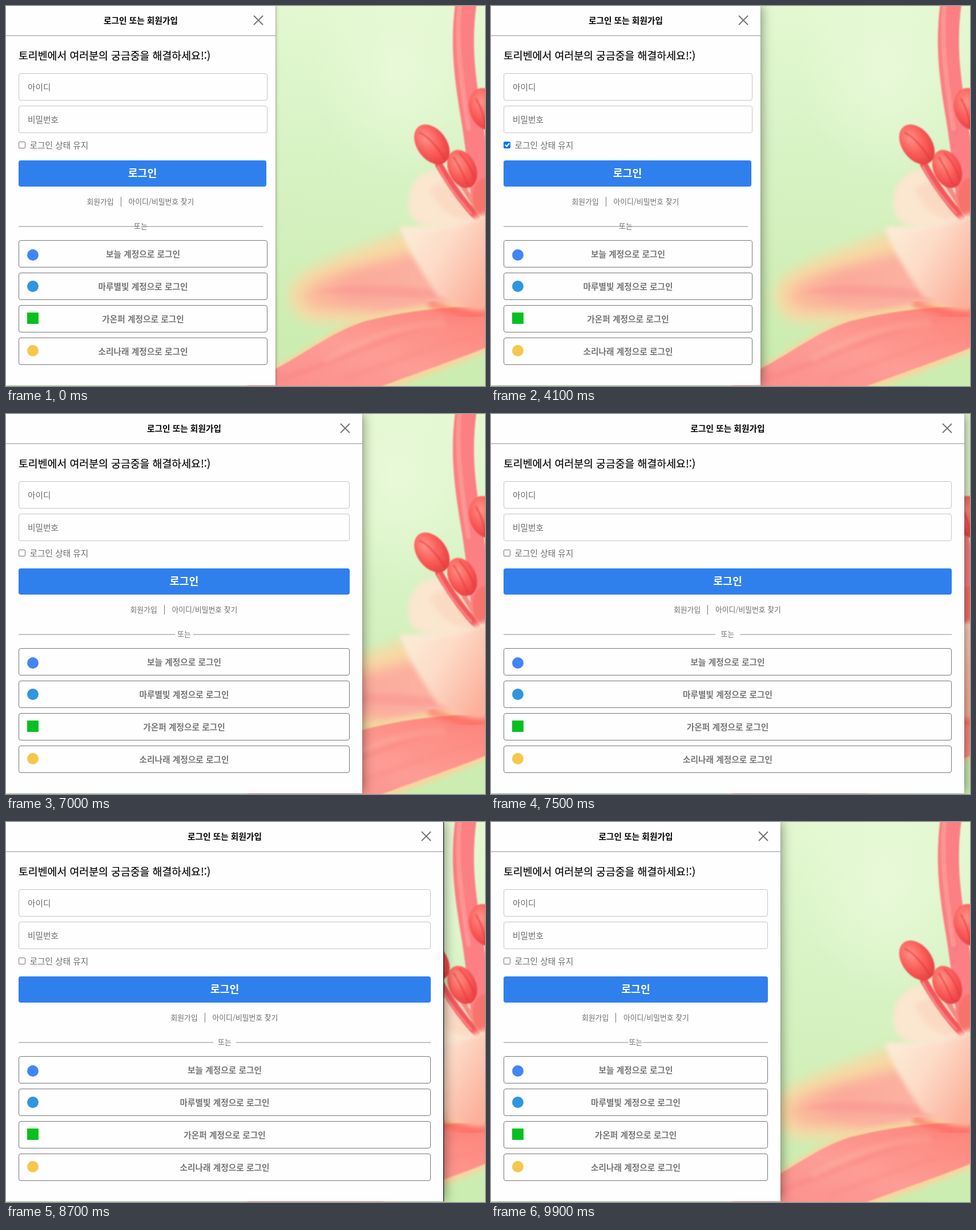
An HTML page for the animation above (10 s loop, 839 px wide and 667 px high).

```html
<!DOCTYPE html>
<html lang="ko">
<head>
<meta charset="utf-8">
<title>로그인 또는 회원가입</title>
<style>
  html, body { margin: 0; width: 100%; height: 100%; overflow: hidden; }
  body { position: relative; background: #d6f1c0; color: #6c6c6c;
    font: 14.7px "Noto Sans CJK KR", "Noto Sans KR", "Noto Sans CJK", sans-serif; white-space: nowrap; }
  .photo { position: absolute; left: 0; top: 0; }
  .page, .page *, .status { position: absolute; box-sizing: border-box; }
  .page { box-sizing: content-box; left: 0; top: 0; width: 472px; height: 666px; background: #fefefe;
    border-right: 0 solid #000; animation: resize 10s step-end infinite, shadow 10s step-end infinite; }

  .title { left: 0; top: 0; width: 100%; height: 53px; line-height: 49px; text-align: center;
    font-weight: 700; color: #000; border-bottom: 2px solid #c4c4c4; }
  .close { right: 21px; top: 16px; width: 18px; height: 18px; fill: none; stroke: #767676; stroke-width: 2; }
  .lead { left: 22px; top: 72px; line-height: 28px; font-size: 18.33px; color: #000; -webkit-text-stroke: .2px; }

  .box { left: 22px; top: var(--y); width: max(436px, 100% - 44px); height: 48px; line-height: 46px;
    border: 1px solid #c4c4c4; border-radius: 4px; padding-left: 15px; }
  .social { border-color: #767676; padding: 0; text-align: center; font-weight: 700; color: #767676; }
  .mark { left: 14px; top: 13px; width: 20px; height: 20px; border-radius: var(--r, 50%); background: var(--c); }
  .caret { left: 15px; top: 13px; width: 1px; height: 21px; background: #000; animation: caret 10s step-end infinite; }

  .check { left: 22px; top: 238px; width: 12px; height: 12px; border: 1px solid #767676; border-radius: 2px;
    background: #fff; animation: check 10s step-end infinite; }
  .check::after { content: ""; position: absolute; left: 3px; top: 0; width: 3px; height: 6px;
    border: solid #fff; border-width: 0 2px 2px 0; transform: rotate(42deg); }
  .keep { left: 41.5px; top: 234px; line-height: 20px; }
  .login { left: 22px; top: 271px; width: max(434px, 100% - 44px); height: 46px; line-height: 43px;
    border-radius: 4px; background: #2f80ed; color: #fff; text-align: center; font-weight: 700; font-size: 18.33px; }

  .links, .or { left: 50%; font-size: 12.83px; line-height: 20px; }
  .links { top: 333px; }
  .links span:first-child { left: -94.5px; }
  .links i { left: -35.5px; top: 2px; width: 1px; height: 17px; background: #767676; }
  .links span:last-child { left: -21.5px; }
  .or { top: 375.5px; transform: translateX(-50%); }
  .rule { top: 386px; height: 2px; width: max(210px, (100% - 44px) * .4725); background: #c4c4c4; }

  .bubble { left: 149px; top: 178px; width: 184px; height: 34px; padding-left: 54px; line-height: 32px; font-size: 12px;
    color: #222; background: #fff; border: 1px solid #c8c8c8; border-radius: 2px;
    box-shadow: 0 2px 4px rgba(0,0,0,.25); animation: bubble 10s step-end infinite; }
  .bubble::before { content: ""; position: absolute; left: 22px; top: -5px; width: 8px; height: 8px; background: #fff;
    border: solid #c8c8c8; border-width: 1px 0 0 1px; transform: rotate(45deg); }
  .bubble b { left: 16px; top: 6px; width: 20px; height: 20px; line-height: 18px; border-radius: 2px;
    background: #ff9800; color: #fff; text-align: center; font-size: 14px; }
  .status { left: 0; top: 646px; width: 156px; height: 20px; padding-left: 4px; line-height: 19px; font-size: 10.9px;
    color: #35484c; background: #7ccad1; border: solid #6fb3bb; border-width: 1px 1px 0 0; border-radius: 0 4px 0 0;
    animation: status 10s step-end infinite; }

  @keyframes resize {
    0% { width: 472px; border-right-width: 0; }
    67% { width: 478px; } 68% { width: 508px; } 69% { width: 562px; } 70% { width: 624px; }
    71% { width: 686px; } 72% { width: 742px; } 73% { width: 788px; } 74% { width: 818px; } 75% { width: 829px; }
    78% { width: 812px; } 79% { width: 775px; } 80% { width: 728px; } 81% { width: 682px; } 82% { width: 645px; border-right-width: 0; }
    83% { width: 633px; border-right-width: 4px; } 84% { width: 662px; border-right-width: 3px; }
    85% { width: 702px; border-right-width: 3px; } 86% { width: 740px; border-right-width: 2px; }
    87% { width: 766px; border-right-width: 1px; } 88% { width: 661px; border-right-width: 0; }
    89% { width: 595px; } 90% { width: 535px; } 91%, 100% { width: 507px; border-right-width: 0; }
  }
  @keyframes shadow {
    0% { box-shadow: 0 0 1px 0 rgba(0,0,0,.6), 1px 0 6px rgba(0,0,0,.25); }
    13%, 100% { box-shadow: 0 0 1px 0 rgba(0,0,0,.5), 2px 0 18px rgba(0,0,0,.42); }
  }
  @keyframes caret {
    0%, 18%, 25%, 33%, 100% { opacity: 0; }
    13%, 20%, 30% { opacity: 1; }
  }
  @keyframes check {
    0%, 50%, 100% { background: #fff; border-color: #767676; }
    33%, 46% { background: #fff; border-color: #4f4f4f; }
    36% { background: #fff; border-color: #8d8d8d; }
    37%, 43% { background: #005cc8; border-color: #005cc8; }
    41% { background: #0075ff; border-color: #0075ff; }
    45% { background: #3793ff; border-color: #3793ff; }
  }
  @keyframes bubble {
    0%, 37%, 100% { opacity: 0; }
    25% { opacity: .7; }
    28% { opacity: 1; }
    36% { opacity: .4; }
  }
  @keyframes status {
    0%, 67%, 100% { opacity: 0; }
    53% { opacity: .5; }
    54% { opacity: 1; }
  }
</style>
</head>
<body>
<svg class="photo" width="839" height="667" viewBox="0 0 839 667">
  <defs>
    <linearGradient id="leaf" x1=".75" y1="0" x2=".6" y2="1">
      <stop offset="0" stop-color="#e4f8d2"/><stop offset=".45" stop-color="#d6f2c2"/><stop offset="1" stop-color="#c9ecae"/>
    </linearGradient>
    <radialGradient id="glow"><stop offset="0" stop-color="#e8f9d8"/><stop offset="1" stop-color="#e8f9d8" stop-opacity="0"/></radialGradient>
    <linearGradient id="cream" x1="0" y1="0" x2="1" y2=".7">
      <stop offset="0" stop-color="#fbf0dc"/><stop offset=".5" stop-color="#fddcc8"/><stop offset="1" stop-color="#fcb09b"/>
    </linearGradient>
    <linearGradient id="side" x1="0" y1="0" x2="1" y2="0">
      <stop offset="0" stop-color="#fabf9c"/><stop offset=".3" stop-color="#fba99a"/><stop offset="1" stop-color="#fcb5a5"/>
    </linearGradient>
    <linearGradient id="low" x1="0" y1="1" x2="1" y2="0">
      <stop offset="0" stop-color="#fb8b8b"/><stop offset=".5" stop-color="#fd9d95"/><stop offset="1" stop-color="#fd837a"/>
    </linearGradient>
    <radialGradient id="anther" cx=".45" cy=".3" r=".75">
      <stop offset="0" stop-color="#ff9186"/><stop offset=".5" stop-color="#fb5f5b"/><stop offset="1" stop-color="#e63a3d"/>
    </radialGradient>
    <filter id="soft1"><feGaussianBlur stdDeviation="1.3"/></filter>
    <filter id="soft4" x="-20%" y="-20%" width="140%" height="140%"><feGaussianBlur stdDeviation="4"/></filter>
    <filter id="soft12" x="-30%" y="-40%" width="160%" height="180%"><feGaussianBlur stdDeviation="11"/></filter>
  </defs>
  <rect width="839" height="667" fill="url(#leaf)"/>
  <ellipse cx="690" cy="110" rx="150" ry="190" fill="url(#glow)"/>

  <g filter="url(#soft12)">
    <path d="M496 502C500 462 590 437 710 392L800 470 790 565C700 575 600 552 540 555 508 550 494 527 496 502Z" fill="#f7d9a4"/>
    <path d="M520 504C532 474 630 455 730 426L800 500 780 550C690 550 620 527 560 534 533 533 515 522 520 504Z" fill="url(#side)"/>
  </g>
  <path d="M540 502C600 488 660 488 770 500L780 515C690 512 620 506 540 502Z" fill="#f9918d" opacity=".5" filter="url(#soft4)"/>

  <path d="M420 680L472 632C530 600 570 567 625 548 700 526 780 518 845 518V606C790 630 730 652 650 680Z"
    fill="#f6d59f" filter="url(#soft4)"/>
  <path d="M400 680L472 637C530 606 575 570 630 553 700 535 780 526 845 528V598C780 624 725 642 640 674V680Z"
    fill="url(#low)" filter="url(#soft1)"/>
  <g fill="none" filter="url(#soft4)">
    <path d="M480 655C600 620 690 560 845 540" stroke="#fa7f7a" stroke-width="7" opacity=".5"/>
    <path d="M560 622C640 575 700 562 770 556" stroke="#ffb3a6" stroke-width="10" opacity=".4"/>
    <path d="M590 655C680 625 740 598 845 572" stroke="#fb8a83" stroke-width="8" opacity=".5"/>
  </g>

  <path d="M845 375C790 392 735 395 712 374 697 350 703 310 735 291 770 280 815 300 845 325Z" fill="#fbe6cf" filter="url(#soft4)"/>
  <path d="M742 320C770 300 810 310 845 340V380C800 380 760 370 742 320Z" fill="#fbd3be" opacity=".6" filter="url(#soft4)"/>

  <g fill="none" stroke-linecap="round" filter="url(#soft1)">
    <path d="M808 -20C795 55 802 120 816 200 825 255 829 300 835 350" stroke="#fc7f83" stroke-width="37"/>
    <path d="M797 -20C786 50 796 120 810 215" stroke="#ff9f9b" stroke-width="8" opacity=".7"/>
    <path d="M758 278C775 308 798 342 824 370" stroke="#f2585b" stroke-width="13"/>
    <path d="M757 282C772 312 793 340 815 364" stroke="#ff8784" stroke-width="3"/>
    <path d="M800 316L830 365" stroke="#f58a80" stroke-width="8"/>
  </g>
  <ellipse cx="839" cy="336" rx="21" ry="34" fill="#f8736c" filter="url(#soft1)"/>
  <g fill="url(#anther)" filter="url(#soft1)">
    <ellipse cx="840" cy="181" rx="28" ry="38" transform="rotate(-20 840 181)"/>
    <ellipse cx="799" cy="286" rx="24" ry="35" transform="rotate(-24 799 286)"/>
    <ellipse cx="746" cy="243" rx="26" ry="39" transform="rotate(-36 746 243)"/>
  </g>
  <g fill="none" stroke="#e0343a" stroke-width="3" opacity=".55" filter="url(#soft1)">
    <path d="M724 222C742 230 757 250 770 270M784 265C792 277 802 298 809 314M794 258C806 270 817 288 820 304M823 162C832 178 838 196 840 213"/>
  </g>

  <path d="M690 389C735 390 800 385 845 363V540C810 536 785 522 757 510 735 475 705 435 690 389Z" fill="url(#cream)" filter="url(#soft4)"/>
  <path d="M694 391C740 394 790 390 845 365" fill="none" stroke="#fff1e4" stroke-width="5" opacity=".5" filter="url(#soft4)"/>
  <path d="M740 522C780 536 815 548 845 538" fill="none" stroke="#fd6558" stroke-width="12" opacity=".6" filter="url(#soft4)"/>
</svg>

<main class="page">
  <div class="title">로그인 또는 회원가입</div>
  <svg class="close" viewBox="0 0 18 18"><path d="M1 1L17 17M17 1L1 17"/></svg>
  <div class="lead">토리벤에서 여러분의 궁금중을 해결하세요!:)</div>
  <div class="box" style="--y:118px">아이디<i class="caret"></i></div>
  <div class="box" style="--y:175px">비밀번호</div>
  <i class="check"></i>
  <div class="keep">로그인 상태 유지</div>
  <div class="login">로그인</div>
  <div class="links"><span>회원가입</span><i></i><span>아이디/비밀번호 찾기</span></div>
  <i class="rule" style="left:22px"></i>
  <i class="rule" style="right:22px"></i>
  <div class="or">또는</div>
  <div class="box social" style="--y:411px"><i class="mark" style="--c:#4285f4;top:15px"></i>보늘 계정으로 로그인</div>
  <div class="box social" style="--y:468px"><i class="mark" style="--c:#2f96dd"></i>마루별빛 계정으로 로그인</div>
  <div class="box social" style="--y:525px"><i class="mark" style="--c:#04c11f;--r:1px;top:12px"></i>가온퍼 계정으로 로그인</div>
  <div class="box social" style="--y:582px"><i class="mark" style="--c:#f5c74a;top:12px"></i>소리나래 계정으로 로그인</div>
  <div class="bubble"><b>!</b>이 입력란을 작성하세요.</div>
</main>
<div class="status">127.0.0.1:5500/.../111_로그...</div>
</body>
</html>
```
